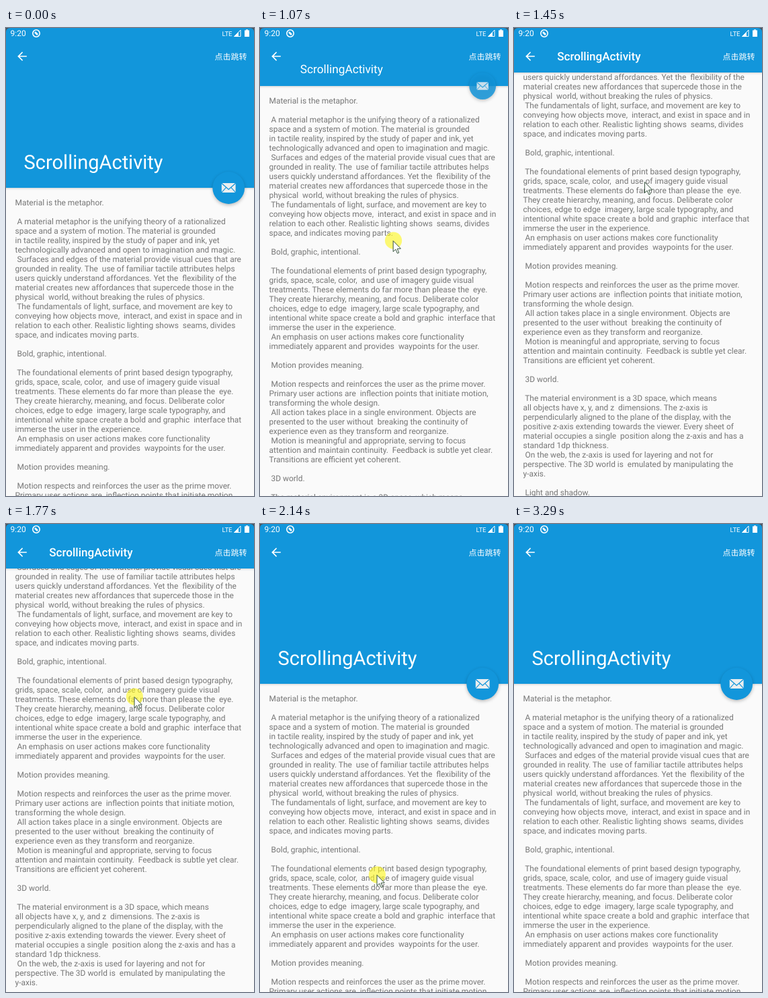
An HTML page with a canvas for the animation above (3790 ms loop, 369 px wide and 694 px high).

```html
<!DOCTYPE html>
<html lang="en">
<head>
<meta charset="utf-8">
<title>ScrollingActivity</title>
<style>
html, body { margin: 0; width: 100%; height: 100%; overflow: hidden; background: #fafafa; }
canvas { display: block; width: 369px; height: 694px; }
</style>
</head>
<body>
<canvas id="stage"></canvas>
<script>
const W = 369, H = 694;
const LOOP = 3790, LEAD = 220, STEP = 76.4;
const BLUE = '#1296db';
const FONT = 'Roboto, sans-serif';
const EXPANDED = 237, COLLAPSED = 66, RANGE = EXPANDED - COLLAPSED;

const TEXT = `Material is the metaphor.

 A material metaphor is the unifying theory of a rationalized
space and a system of motion. The material is grounded
in tactile reality, inspired by the study of paper and ink, yet
technologically advanced and open to imagination and magic.
 Surfaces and edges of the material provide visual cues that are
grounded in reality. The  use of familiar tactile attributes helps
users quickly understand affordances. Yet the  flexibility of the
material creates new affordances that supercede those in the
physical  world, without breaking the rules of physics.
 The fundamentals of light, surface, and movement are key to
conveying how objects move,  interact, and exist in space and in
relation to each other. Realistic lighting shows  seams, divides
space, and indicates moving parts.

 Bold, graphic, intentional.

 The foundational elements of print based design typography,
grids, space, scale, color,  and use of imagery guide visual
treatments. These elements do far more than please the  eye.
They create hierarchy, meaning, and focus. Deliberate color
choices, edge to edge  imagery, large scale typography, and
intentional white space create a bold and graphic  interface that
immerse the user in the experience.
 An emphasis on user actions makes core functionality
immediately apparent and provides  waypoints for the user.

 Motion provides meaning.

 Motion respects and reinforces the user as the prime mover.
Primary user actions are  inflection points that initiate motion,
transforming the whole design.
 All action takes place in a single environment. Objects are
presented to the user without  breaking the continuity of
experience even as they transform and reorganize.
 Motion is meaningful and appropriate, serving to focus
attention and maintain continuity.  Feedback is subtle yet clear.
Transitions are efficient yet coherent.

 3D world.

 The material environment is a 3D space, which means
all objects have x, y, and z  dimensions. The z-axis is
perpendicularly aligned to the plane of the display, with the
positive z-axis extending towards the viewer. Every sheet of
material occupies a single  position along the z-axis and has a
standard 1dp thickness.
 On the web, the z-axis is used for layering and not for
perspective. The 3D world is  emulated by manipulating the
y-axis.

 Light and shadow.`.split('\n');

const canvas = document.getElementById('stage');
const ctx = canvas.getContext('2d');
const dpr = window.devicePixelRatio || 1;
canvas.width = W * dpr;
canvas.height = H * dpr;
ctx.textRendering = 'geometricPrecision';

const clamp = v => Math.min(1, Math.max(0, v));
const mix = (a, b, f) => a + (b - a) * f;
const ramp = (k, from, to) => clamp((k - from) / (to - from));

// All motion below is a function of the step count k.
// Drag up with a short fling, rest, then drag back down.
function scrollAt(k) {
  if (k < 7) return 0;
  if (k < 19) return Math.min(34 + 29.3 * (k - 7), 308);
  return mix(308, 0, ramp(k, 19, 24.8) ** 1.35);
}

function pointerAt(k) {
  const stops = [
    { k: 0, x: 261, y: 604 },
    { k: 7, x: 201, y: 426 },
    { k: 14, x: 196, y: 232 },
    { k: 19, x: 192, y: 222 },
    { k: 20, x: 191, y: 256 },
    { k: 25, x: 174, y: 520 },
    { k: 29, x: 178, y: 601 },
    { k: 32, x: 186, y: 601 },
    { k: 39, x: 354, y: 656 },
  ];
  const i = Math.max(1, stops.findIndex(s => s.k >= k));
  const a = stops[i - 1], b = stops[i], f = ramp(k, a.k, b.k);
  return { x: mix(a.x, b.x, f), y: mix(a.y, b.y, f) };
}

const pressedAt = k => (k >= 6 && k < 16) || (k >= 19 && k < 29);
const glowAt = k => ramp(k, 25, 29) * (1 - ramp(k, 30, 38));

function fabScaleAt(k) {
  const hide = ramp(k, 10, 12.7) ** 1.8;
  const show = 1 - (1 - ramp(k, 22.4, 25)) ** 2;
  return 1 - hide + show;
}

function trace(points, close) {
  ctx.beginPath();
  points.forEach(([x, y]) => ctx.lineTo(x, y));
  if (close) ctx.closePath();
}

function fillPoly(points, color = '#fff') {
  trace(points, true);
  ctx.fillStyle = color;
  ctx.fill();
}

function strokeLine(points, width, color = '#fff', close = false) {
  trace(points, close);
  ctx.lineWidth = width;
  ctx.strokeStyle = color;
  ctx.stroke();
}

function disc(x, y, r, color) {
  ctx.beginPath();
  ctx.arc(x, y, r, 0, 7);
  ctx.fillStyle = color;
  ctx.fill();
}

function label(text, x, y, font, color = '#fff') {
  ctx.font = font;
  ctx.fillStyle = color;
  ctx.fillText(text, x, y);
}

function shadow(alpha, blur, dy) {
  ctx.shadowColor = `rgba(0,0,0,${alpha})`;
  ctx.shadowBlur = blur * dpr;
  ctx.shadowOffsetY = dy * dpr;
}

function drawBody(scroll) {
  TEXT.forEach((line, i) => {
    const y = 263.2 + i * 14 - scroll;
    if (y > 50 && y < H + 14) label(line, 13.5, y, `11.96px ${FONT}`, '#767676');
  });
}

function drawGlow(top, amount, x) {
  if (amount <= 0) return;
  ctx.save();
  ctx.beginPath();
  ctx.rect(0, top, W, H - top);
  ctx.clip();
  ctx.globalAlpha = 0.12 * amount;
  disc(W / 2 + (x - W / 2) * 0.2, top + 49 * amount - W, W, BLUE);
  ctx.restore();
}

function drawStatus() {
  label('9:20', 6.5, 12.4, `12px ${FONT}`);
  ctx.beginPath();
  ctx.arc(45, 8, 5.2, 0, 7);
  ctx.lineWidth = 1.6;
  ctx.strokeStyle = '#fff';
  ctx.stroke();
  strokeLine([[43, 6], [47, 10]], 2.6);

  label('LTE', 321.5, 11.6, `9.6px ${FONT}`);
  strokeLine([[339.5, 12.5], [349, 12.5], [349, 3]], 1, '#fff', true);
  fillPoly([[339.5, 12.5], [346, 12.5], [346, 6]]);
  ctx.fillRect(355, 3.4, 7, 9.6);
  ctx.fillRect(357, 2.2, 3, 1.5);
}

function drawCorner(x, dir) {
  ctx.beginPath();
  ctx.moveTo(x, 0);
  ctx.lineTo(x + 6 * dir, 0);
  ctx.quadraticCurveTo(x, 0, x, 6);
  ctx.fillStyle = '#4a4f55';
  ctx.fill();
}

function drawBackArrow() {
  ctx.save();
  ctx.translate(13.75, 31.75);
  ctx.scale(0.854, 0.854);
  fillPoly([[20, 11], [7.83, 11], [13.42, 5.41], [12, 4], [4, 12],
    [12, 20], [13.41, 18.59], [7.83, 13], [20, 13]]);
  ctx.restore();
}

function drawHeader(bottom, f) {
  ctx.save();
  shadow(0.18, 3, 1);
  ctx.fillStyle = BLUE;
  ctx.fillRect(-8, -8, W + 16, bottom + 8);
  ctx.restore();

  drawCorner(0, 1);
  drawCorner(W, -1);
  drawStatus();
  drawBackArrow();
  label('点击跳转', 310.5, 47, '500 12px "Noto Sans CJK SC", "Noto Sans CJK", sans-serif');

  // Size decelerates while position stays linear.
  const size = mix(29, 17.1, 1 - (1 - f) ** 2);
  const weight = f >= 1 ? 500 : 400;
  label('ScrollingActivity', mix(26.6, 64.2, f), mix(208.9, 47.7, f), `${weight} ${size}px ${FONT}`);
}

function drawFab(y, scale) {
  if (scale <= 0.01) return;
  ctx.save();
  ctx.globalAlpha = scale;
  ctx.translate(331.2, y);
  ctx.scale(scale, scale);
  ctx.save();
  shadow(0.25, 5, 2);
  disc(0, 0, 23.9, BLUE);
  ctx.restore();

  ctx.beginPath();
  ctx.roundRect(-10.4, -7, 20.8, 14, 1.2);
  ctx.fillStyle = '#eceeef';
  ctx.fill();
  strokeLine([[-10.4, -6.8], [0, 2.4], [10.4, -6.8]], 1.4, BLUE);
  for (const d of [-1, 1]) strokeLine([[10.4 * d, 6.8], [3.6 * d, -0.6]], 1.1, BLUE);
  ctx.restore();
}

function drawPointer({ x, y }, pressed) {
  if (pressed) disc(x + 0.4, y, 12.6, 'rgba(253,247,25,0.6)');
  ctx.save();
  ctx.translate(x, y + 0.5);
  const arrow = [[0, 0], [0, 16], [3.7, 12.6], [6.3, 18.5], [8.6, 17.5], [6.1, 11.8], [11.3, 11.5]];
  fillPoly(arrow);
  strokeLine(arrow, 1, '#34523b', true);
  ctx.restore();
}

function draw(now) {
  const k = Math.floor((now % LOOP - LEAD) / STEP);
  const scroll = Math.round(scrollAt(k));
  const f = clamp(scroll / RANGE);
  const bottom = EXPANDED - RANGE * f;
  const pointer = pointerAt(k);

  ctx.setTransform(dpr, 0, 0, dpr, 0, 0);
  ctx.fillStyle = '#fafafa';
  ctx.fillRect(0, 0, W, H);
  drawBody(scroll);
  drawGlow(bottom, glowAt(k), pointer.x);
  drawHeader(bottom, f);
  drawFab(bottom, fabScaleAt(k));
  if (k >= 0 && k < 40) drawPointer(pointer, pressedAt(k));
}

const start = performance.now();
function tick() {
  draw(performance.now() - start);
  requestAnimationFrame(tick);
}
tick();
</script>
</body>
</html>
```
